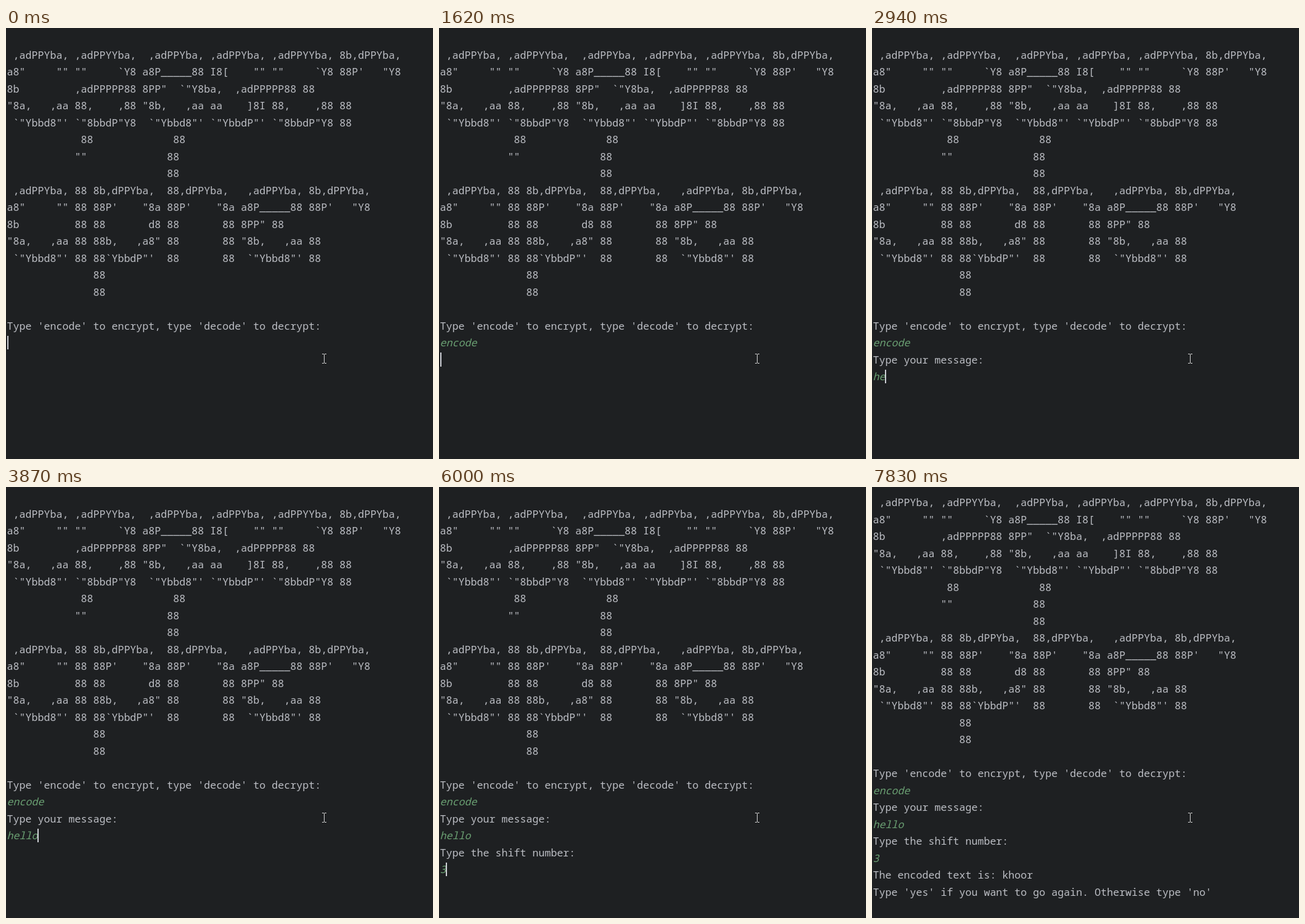
An HTML page that plays this animation: 693x700 px, repeating every 8000 ms.

```html
<!DOCTYPE html>
<html lang="en">
<head>
<meta charset="utf-8">
<title>Caesar cipher console</title>
<style>
  html, body { margin: 0; width: 100%; height: 100%; overflow: hidden; background: #1e2022; }
  #stage { position: relative; width: 693px; height: 700px; overflow: hidden; background: #1e2022; }
  #screen { position: absolute; inset: 0; }
  pre {
    position: absolute; left: 1.5px; top: 29.75px; margin: 0;
    font: 500 16.667px/27.5px "Noto Sans Mono", "DejaVu Sans Mono", monospace;
    font-variant-ligatures: none; color: #bcbec4;
  }
  .in { color: #6a9f72; font-style: italic; font-weight: 400; }
  #caret { position: absolute; width: 2px; background: #ced0d6; }
  #pointer { position: absolute; left: 512px; top: 529px; }
</style>
</head>
<body>
<div id="stage">
<div id="screen">
<pre id="log">
 ,adPPYba, ,adPPYYba,  ,adPPYba, ,adPPYba, ,adPPYYba, 8b,dPPYba,
a8"     "" ""     `Y8 a8P_____88 I8[    "" ""     `Y8 88P'   "Y8
8b         ,adPPPPP88 8PP"  `"Y8ba,  ,adPPPPP88 88
"8a,   ,aa 88,    ,88 "8b,   ,aa aa    ]8I 88,    ,88 88
 `"Ybbd8"' `"8bbdP"Y8  `"Ybbd8"' `"YbbdP"' `"8bbdP"Y8 88
            88             88
           ""             88
                          88
 ,adPPYba, 88 8b,dPPYba,  88,dPPYba,   ,adPPYba, 8b,dPPYba,
a8"     "" 88 88P'    "8a 88P'    "8a a8P_____88 88P'   "Y8
8b         88 88       d8 88       88 8PP" 88
"8a,   ,aa 88 88b,   ,a8" 88       88 "8b,   ,aa 88
 `"Ybbd8"' 88 88`YbbdP"'  88       88  `"Ybbd8"' 88
              88
              88

Type 'encode' to encrypt, type 'decode' to decrypt:
</pre>
<div id="caret"></div>
</div>
<svg id="pointer" width="10" height="18" fill="none" stroke="#d8d8d8">
  <path d="M1 .5H4M5 .5H8M4.5 1V15M1 15.5H4M5 15.5H8"/>
</svg>
</div>
<script>
const LOOP = 8000, ROW = 27.5, COL = 10, FIRST_ROW = 17, TOP = 32.5;
const SCROLL_AT = 6130, SCROLL = 18.6;

// [time, appended text, is program output]
const steps = [
  [50, "e"], [400, "n"], [730, "c"], [1000, "o"], [1200, "d"], [1440, "e"], [1620, "\n"],
  [1820, "Type your message:\n", true],
  [2820, "h"], [2940, "e"], [3400, "l"], [3540, "l"], [3870, "o"], [4190, "\n"],
  [4410, "Type the shift number:\n", true],
  [6000, "3"],
  [6130, "\nThe encoded text is: khoor\nType 'yes' if you want to go again. Otherwise type 'no'\n", true],
];
const caretOff = [[2350, 2820], [5340, 5800], [6790, 7320], [7830, LOOP]];

const byId = id => document.getElementById(id);
const log = byId("log"), caret = byId("caret"), screen = byId("screen");

let typed = "";
const chunks = steps.map(([time, text, output]) => {
  const el = document.createElement("span");
  el.textContent = text;
  if (!output) el.className = "in";
  log.append(el);
  typed += text;
  const lines = typed.split("\n");
  return { time, el, row: FIRST_ROW + lines.length - 1, col: lines.at(-1).length };
});

function placeCaret({ row, col }) {
  const y = TOP + row * ROW;
  const top = Math.floor(y);
  caret.style.left = (col ? 1 + col * COL : 2) + "px";
  caret.style.top = top + "px";
  caret.style.height = Math.ceil(y + 22) - top + "px";
}

function draw(t) {
  let at = { row: FIRST_ROW, col: 0 };
  for (const chunk of chunks) {
    const shown = t >= chunk.time;
    chunk.el.style.visibility = shown ? "visible" : "hidden";
    if (shown) at = chunk;
  }
  placeCaret(at);
  screen.style.top = (t >= SCROLL_AT ? -SCROLL : 0) + "px";
  const off = caretOff.some(([from, to]) => t >= from && t < to);
  caret.style.visibility = off ? "hidden" : "visible";
}

const start = performance.now();
function tick() {
  draw((performance.now() - start) % LOOP);
  requestAnimationFrame(tick);
}
tick();
</script>
</body>
</html>
```
